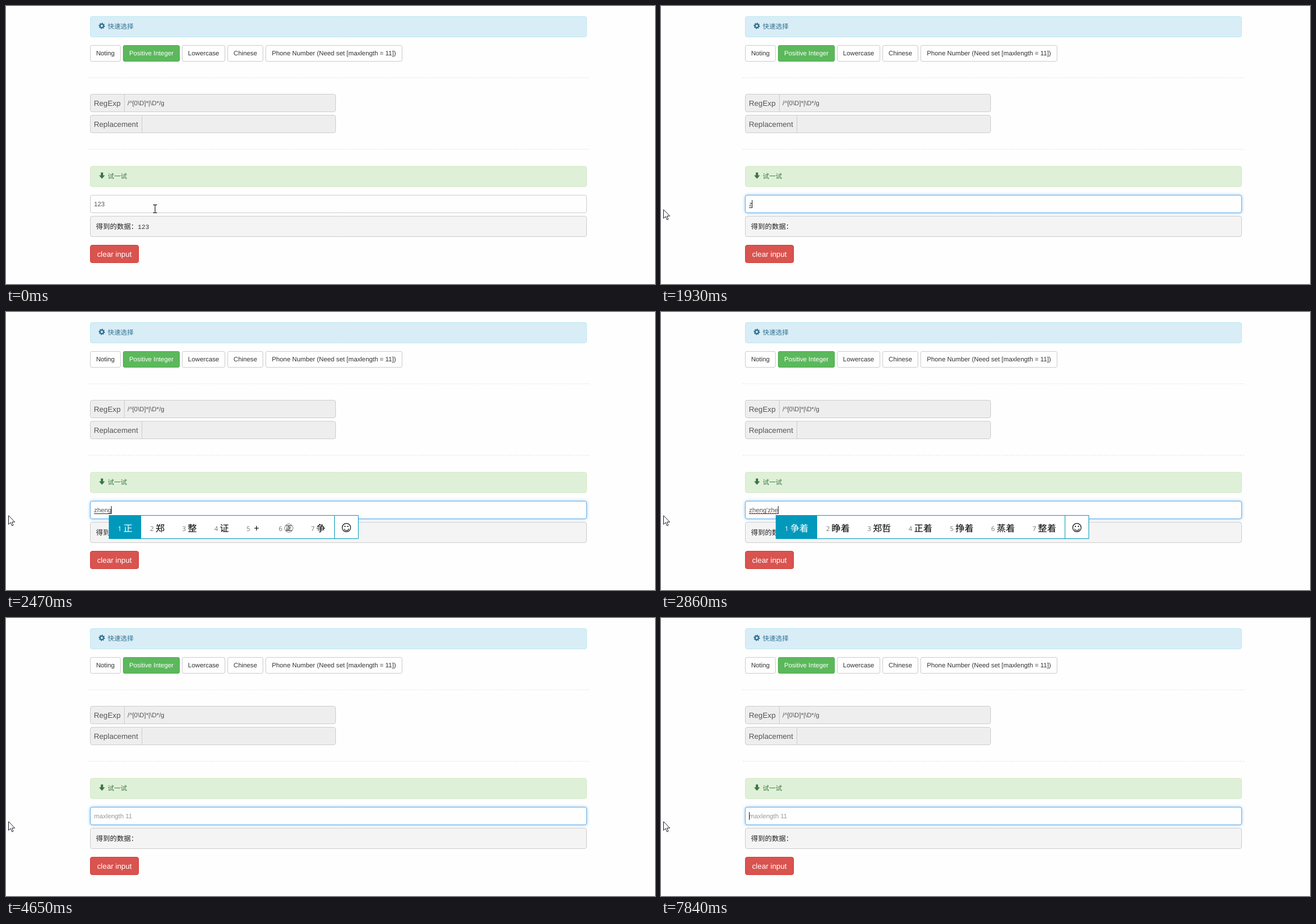
Animation of 1143x490 px, one loop 8 s. Source, as an HTML page with a canvas:

```html
<!DOCTYPE html>
<html lang="zh-CN">
<head>
<meta charset="utf-8">
<title>Input filter demo</title>
<style>
  html, body { margin: 0; width: 100%; height: 100%; overflow: hidden; background: #fefefe; }
  canvas { display: block; }
</style>
</head>
<body>
<canvas id="stage" width="1143" height="490"></canvas>
<script>
const ctx = document.getElementById('stage').getContext('2d');
const LOOP = 8000;
const PAPER = '#fefefe';
const SANS = '"Liberation Sans", Arial, "Noto Sans CJK SC", sans-serif';
const CJK = '"Noto Sans CJK SC", "Noto Sans CJK", sans-serif';
const MONO = '"Liberation Mono", monospace';
const SMALL = '11.33px ' + SANS;
const NORMAL = '13.22px ' + SANS;
const TEXT_X = 155;

// Composition steps: time typed, time candidates refresh, typed letters, candidates.
const COMPOSE = [
  [1930, 1990, "z", '在 子 中 这 字 自 做'],
  [2070, 2110, "zh", '这 中 只 着 者 种 之'],
  [2190, 2220, "zhe", '这 着 者 折 哲 遮 辙'],
  [2290, 2320, "zhen", '真 镇 阵 震 针 振 枕'],
  [2470, 2470, "zheng", '正 郑 整 证 + ㊣ 争'],
  [2600, 2630, "zheng'z", '正在 政治 正字 整治 症状 争执 正直'],
  [2730, 2760, "zheng'zh", '正中 郑重 政治 整治 症状 争执 正直'],
  [2830, 2860, "zheng'zhe", '争着 睁着 郑哲 正着 挣着 蒸着 整着'],
  [2910, 2940, "zheng'zhen", '整真的 正真 整阵 正针 证真 争枕 正震中'],
  [3090, 3120, "zheng'zheng", '整整 正正 铮铮 怔怔 蒸蒸 郑铮 整政'],
  [3310, 3350, "zheng'zheng's", '正整数 整整 正正 铮铮 怔怔 蒸蒸 郑铮'],
  [3440, 3480, "zheng'zheng'sh", '正整数 整整 正正 铮铮 怔怔 蒸蒸 郑铮'],
  [3640, 3690, "zheng'zheng'shu", '正整数 整整 正正 铮铮 怔怔 蒸蒸 郑铮']
];
const COMMIT = 4110;

// Number of digits of DIGITS shown from each time on.
const DIGITS = '1223213';
const COUNTS = [
  [COMMIT, 0], [5240, 1], [5390, 2], [5740, 3], [5760, 4], [6040, 5], [6090, 6], [6150, 7],
  [6760, 6], [6960, 5], [7140, 4], [7290, 3], [7480, 2], [7630, 1], [7840, 0]
];
const CARET_OFF = [[520, 1930], [4650, 5160], [6660, 7190], [7720, 7840]];
const FOCUS = [[0, 0], [120, 0.35], [175, 0.7], [230, 1]];
const POINTER = [
  [0, 262], [520, 226], [550, 168], [580, 112], [610, 62], [640, 26], [670, 9], [850, 4]
];

const latest = (rows, t) => rows.findLast(row => row[0] <= t);

function text(str, x, y, font, color, align = 'left') {
  ctx.font = font;
  ctx.fillStyle = color;
  ctx.textAlign = align;
  ctx.fillText(str, x, y);
}

function widthOf(str, font) {
  ctx.font = font;
  return ctx.measureText(str).width;
}

function box(x1, y1, x2, y2, fill, stroke, r = 3.5) {
  ctx.beginPath();
  ctx.roundRect(x1 + 0.5, y1 + 0.5, x2 - x1 - 1, y2 - y1 - 1, r);
  ctx.fillStyle = fill;
  ctx.fill();
  ctx.strokeStyle = stroke;
  ctx.lineWidth = 1;
  ctx.stroke();
}

function line(x1, y1, x2, y2, color) {
  ctx.beginPath();
  ctx.moveTo(x1, y1);
  ctx.lineTo(x2, y2);
  ctx.strokeStyle = color;
  ctx.lineWidth = 1;
  ctx.stroke();
}

function dashedRule(y) {
  ctx.setLineDash([3, 2]);
  line(144, y + 0.5, 1028, y + 0.5, '#e6e6e6');
  ctx.setLineDash([]);
}

function gear(cx, cy, color) {
  ctx.fillStyle = color;
  ctx.beginPath();
  for (let i = 0; i < 32; i++) {
    const a = (i + 0.5) * Math.PI / 16;
    const r = i % 4 < 2 ? 5.7 : 4.2;
    ctx.lineTo(cx + r * Math.cos(a), cy + r * Math.sin(a));
  }
  ctx.closePath();
  ctx.moveTo(cx + 2, cy);
  ctx.arc(cx, cy, 2, 0, 7);
  ctx.fill('evenodd');
}

function polygon(points, x, y) {
  ctx.beginPath();
  points.forEach(([px, py]) => ctx.lineTo(x + px, y + py));
  ctx.closePath();
}

function drawButtons() {
  const buttons = [
    ['Noting', 148, 202], ['Positive Integer', 206, 306], ['Lowercase', 310, 386],
    ['Chinese', 390, 453], ['Phone Number (Need set [maxlength = 11])', 457, 698]
  ];
  buttons.forEach(([label, x1, x2], i) => {
    const on = i === 1;
    box(x1, 69, x2, 98, on ? '#5cb85c' : PAPER, on ? '#4cae4c' : '#ccc', 2.5);
    text(label, (x1 + x2) / 2, 87, SMALL, on ? '#fff' : '#333', 'center');
  });
}

function drawField(label, y, split, value) {
  box(148, y, 581, y + 32, '#eee', '#ccc');
  line(split + 0.5, y + 1, split + 0.5, y + 31, '#ccc');
  text(label, 154.7, y + 21, NORMAL, '#555');
  text(value, 214, y + 20, SMALL, '#555');
}

function drawPage() {
  ctx.fillStyle = PAPER;
  ctx.fillRect(0, 0, 1143, 490);

  box(148, 18, 1023, 55, '#d9edf7', '#bce8f1');
  gear(168.7, 35, '#31708f');
  text('快速选择', 179, 39.5, '11.4px ' + CJK, '#31708f');
  drawButtons();
  dashedRule(126);
  drawField('RegExp', 155, 208, '/^[0\\D]*|\\D*/g');
  drawField('Replacement', 192, 239, '');
  dashedRule(252);

  box(148, 282, 1023, 319, '#dff0d8', '#d6e9c6');
  polygon([[-2, 0], [2, 0], [2, 5], [5.2, 5], [0, 11], [-5.2, 5], [-2, 5]], 169, 293.5);
  ctx.fillStyle = '#3c763d';
  ctx.fill();
  text('试一试', 179, 303.5, '11.4px ' + CJK, '#3c763d');

  box(148, 370, 1023, 407, '#f4f4f4', '#ccc');
  box(148, 421, 234, 453, '#d9534f', '#d43f3a');
  text('clear input', 191, 441.5, NORMAL, '#fff', 'center');
}

function drawInputFrame(focus) {
  if (focus) {
    ctx.save();
    ctx.shadowColor = `rgba(102,175,233,${0.6 * focus})`;
    ctx.shadowBlur = 5;
    box(148, 333, 1023, 365, PAPER, '#9cc8ee');
    ctx.restore();
  }
  box(148, 333, 1023, 365, PAPER, '#ccc');
  if (focus) {
    ctx.globalAlpha = focus;
    box(148, 333, 1023, 365, PAPER, '#66afe9');
    ctx.globalAlpha = 1;
  }
}

function drawSelection(value, pointerX) {
  let start = 0;
  while (start < value.length && TEXT_X + widthOf(value.slice(0, start + 1), SMALL) - 3 < pointerX) start++;
  const x = TEXT_X + widthOf(value.slice(0, start), SMALL);
  const part = value.slice(start);
  ctx.fillStyle = '#3390ff';
  ctx.fillRect(x, 342, widthOf(part, SMALL), 14);
  text(part, x, 353, SMALL, '#fff');
}

function drawCompositionMarks(str, width) {
  ctx.fillStyle = '#222';
  ctx.fillRect(TEXT_X, 355, width, 1);
  if (!str.includes("'")) return;
  ctx.beginPath();
  for (let x = 0; x <= width; x += 2) ctx.lineTo(TEXT_X + x, x % 4 ? 354.4 : 356);
  ctx.strokeStyle = '#d22';
  ctx.lineWidth = 0.9;
  ctx.stroke();
}

function drawCandidates(words, left) {
  const cell = word => 40.6 + 16.05 * word.length;
  const divider = Math.round(left + 1.5 + words.reduce((sum, w) => sum + cell(w), 0));
  const right = divider + 42;
  const blue = '#0099bc';
  box(left, 358, right, 400, '#fff', blue, 0);
  line(divider - 0.5, 358, divider - 0.5, 400, blue);
  ctx.fillStyle = blue;
  ctx.fillRect(left, 358, Math.round(cell(words[0]) + 0.6), 42);

  let x = left;
  words.forEach((word, i) => {
    text(i + 1, x + 16, 385.5, '11.5px "Open Sans", sans-serif', i ? '#767676' : '#fff');
    [...word].forEach((ch, k) =>
      text(ch, x + 33.7 + 16.05 * k, 386.5, '16.1px ' + CJK, i ? '#000' : '#fff', 'center'));
    x += cell(word);
  });
  drawSmiley(right - 21.5, 380);
}

function drawSmiley(x, y) {
  ctx.strokeStyle = ctx.fillStyle = '#111';
  ctx.lineWidth = 1.2;
  ctx.beginPath();
  ctx.arc(x, y, 7.4, 0, 7);
  ctx.moveTo(x + 4, y + 2);
  ctx.arc(x, y + 1, 4.2, 0.25, Math.PI - 0.25);
  ctx.stroke();
  for (const dx of [-2.6, 2.6]) {
    ctx.beginPath();
    ctx.arc(x + dx, y - 2.2, 1.1, 0, 7);
    ctx.fill();
  }
}

function drawPointer(x) {
  if (x > 148) {
    line(x + 0.5, 351, x + 0.5, 364, '#000');
    line(x - 3, 350.5, x + 4, 350.5, '#000');
    line(x - 3, 364.5, x + 4, 364.5, '#000');
    return;
  }
  polygon([[0, 0], [0, 15.5], [3.6, 12.2], [6, 18], [8.4, 17], [6, 11.4], [11, 11.4]], x + 0.5, 358.8);
  ctx.fillStyle = '#fff';
  ctx.fill();
  ctx.strokeStyle = '#1a1a2a';
  ctx.lineWidth = 1;
  ctx.stroke();
}

function draw(t) {
  const step = t < COMMIT && latest(COMPOSE, t);
  const count = latest(COUNTS, t);
  const digits = count ? DIGITS.slice(0, count[1]) : step ? '' : '123';
  const value = step ? step[2] : digits;
  const focus = latest(FOCUS, t)[1];
  const pointerX = latest(POINTER, t)[1];
  const width = widthOf(value, SMALL);
  const caretX = Math.floor(TEXT_X + width);

  drawPage();
  drawInputFrame(focus);
  if (value) text(value, TEXT_X, 353, SMALL, '#555');
  else text('maxlength 11', TEXT_X, 353, SMALL, '#999');
  if (t >= 520 && t < COMPOSE[0][0]) drawSelection(value, pointerX);
  if (step) drawCompositionMarks(value, width);

  const blinkedOff = CARET_OFF.some(([from, to]) => t >= from && t < to);
  if (focus && !blinkedOff) {
    ctx.fillStyle = '#222';
    ctx.fillRect(caretX, 342, 1, 14);
  }

  text('得到的数据：', 158.4, 392.5, '12.27px ' + CJK, '#222');
  text(digits, 232, 392.5, '11.2px ' + MONO, '#333');

  const shown = step && COMPOSE.findLast(row => row[1] <= t);
  if (shown) drawCandidates(shown[3].split(' '), caretX - 4);
  drawPointer(pointerX);
}

const begin = performance.now();
function tick() {
  ctx.textRendering = 'geometricPrecision';
  draw((performance.now() - begin) % LOOP);
  requestAnimationFrame(tick);
}
tick();
</script>
</body>
</html>
```
